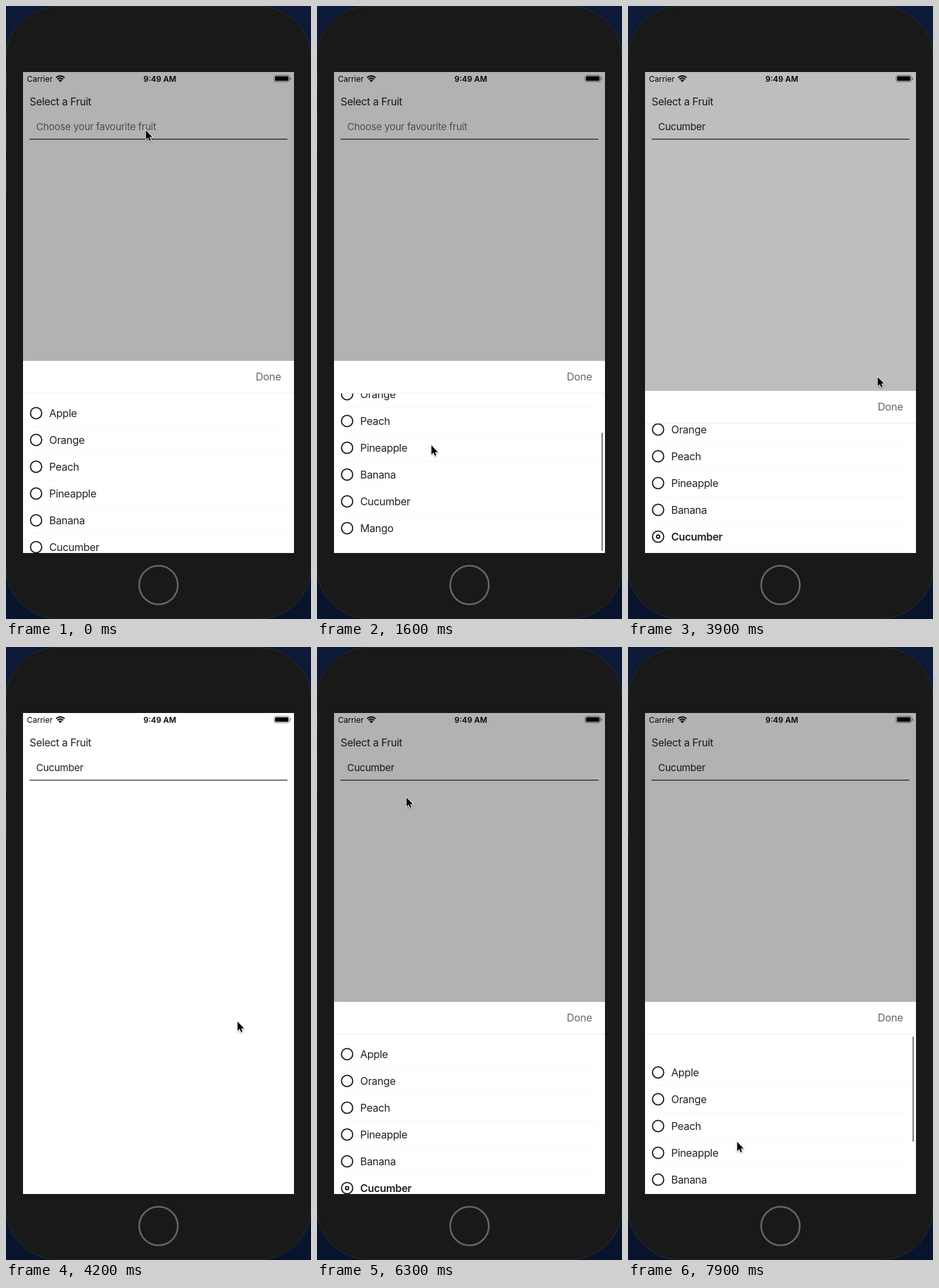
These frames come from a looping animation (466 by 938 pixels, 8000 ms). An HTML page with a canvas:

```html
<!DOCTYPE html>
<html lang="en">
<head>
<meta charset="utf-8">
<title>Fruit picker</title>
<style>
  html, body { margin: 0; width: 100%; height: 100%; overflow: hidden; background: #0b1730; }
  canvas { display: block; width: 466px; height: 938px; }
</style>
</head>
<body>
<canvas id="stage"></canvas>
<script>
const W = 466, H = 938, LOOP = 8000, STEP = 100;
const SCREEN = { x: 26, y: 101, w: 414, h: 736 };
const SHEET_Y = 543, LIST_Y = 593, LIST_H = 244, ROW = 41, MAX_SCROLL = 62;
const FRUITS = ['Apple', 'Orange', 'Peach', 'Pineapple', 'Banana', 'Cucumber', 'Mango'];
const PICK = 5, INK = '#212121';

// Pointer path: time, x, y
const POINTER = [
  [0, 213, 189], [100, 213, 189], [1000, 160, 748], [1600, 174, 671],
  [2200, 175, 778], [2300, 175, 778], [2800, 303, 680], [3200, 388, 592],
  [3600, 383, 566], [3800, 383, 566], [4200, 353, 572], [4300, 309, 579],
  [4800, 309, 579], [5600, 126, 199], [5700, 124, 198], [5800, 124, 198],
  [6300, 136, 229], [6560, 160, 698], [6700, 163, 645], [7050, 165, 616],
  [7600, 164, 650], [7900, 166, 756], [8000, 166, 760]
];

const canvas = document.getElementById('stage');
const ctx = canvas.getContext('2d');
const dpr = window.devicePixelRatio || 1;
canvas.width = W * dpr;
canvas.height = H * dpr;

const clamp = (v, lo = 0, hi = 1) => Math.min(hi, Math.max(lo, v));
const ramp = (t, a, b) => clamp((t - a) / (b - a));
const easeOut = p => 1 - (1 - p) ** 3;
const easeInOut = p => p * p * (3 - 2 * p);

// Slope at a key, flat where the motion turns round
function slope(i, axis) {
  const a = POINTER[i - 1], b = POINTER[i], c = POINTER[i + 1];
  if (!a || !c) return 0;
  const s1 = (b[axis] - a[axis]) / (b[0] - a[0]);
  const s2 = (c[axis] - b[axis]) / (c[0] - b[0]);
  return s1 * s2 <= 0 ? 0 : 2 * s1 * s2 / (s1 + s2);
}

function pointerAt(t) {
  let i = 0;
  while (i < POINTER.length - 2 && t >= POINTER[i + 1][0]) i++;
  const a = POINTER[i], b = POINTER[i + 1], d = b[0] - a[0], u = (t - a[0]) / d;
  const at = axis =>
    a[axis] + (b[axis] - a[axis]) * u * u * (3 - 2 * u) +
    d * u * (1 - u) * ((1 - u) * slope(i, axis) - u * slope(i + 1, axis));
  return { x: at(1), y: at(2) };
}

const stretch = d => LIST_H * (1 - 1 / (d * 0.55 / LIST_H + 1));
function rubber(d) {
  if (d < 0) return -stretch(-d);
  return d > MAX_SCROLL ? MAX_SCROLL + stretch(d - MAX_SCROLL) : d;
}

function scrollAt(t) {
  const y = pointerAt(t).y;
  if (t < 1000) return 0;
  if (t <= 1600) return rubber(748 - y);
  if (t < 4300) {
    const over = rubber(748 - pointerAt(1600).y) - MAX_SCROLL;
    return MAX_SCROLL + over * (1 - easeOut(ramp(t, 1600, 2200)));
  }
  return t < 6560 ? 0 : rubber(698.5 - y);
}

function barAlpha(t) {
  if (t >= 6560) return 1;
  return ramp(t, 1000, 1100) * (1 - ramp(t, 1950, 2200));
}

function sheetAt(t) {
  if (t < 5000) return 1 - easeInOut(ramp(t, 3800, 4200));
  return easeOut(ramp(t, 5800, 6250));
}

function text(str, x, y, size, color = INK, weight = 400, track = 0, align = 'left') {
  ctx.font = `${weight} ${size}px Inter, "Liberation Sans", sans-serif`;
  ctx.letterSpacing = track + 'px';
  ctx.textAlign = align;
  ctx.fillStyle = color;
  ctx.fillText(str, x, y);
}

function rect(x, y, w, h, color) {
  ctx.fillStyle = color;
  ctx.fillRect(x, y, w, h);
}

function pill(x, y, w, h, r, fill, stroke, line = 1) {
  ctx.beginPath();
  ctx.roundRect(x, y, w, h, r);
  if (fill) { ctx.fillStyle = fill; ctx.fill(); }
  if (stroke) { ctx.strokeStyle = stroke; ctx.lineWidth = line; ctx.stroke(); }
}

function ring(x, y, r, color, line) {
  ctx.beginPath();
  ctx.arc(x, y, r, 0, Math.PI * 2);
  ctx.strokeStyle = color;
  ctx.lineWidth = line;
  ctx.stroke();
}

function drawPhone() {
  const back = ctx.createLinearGradient(0, 0, 0, H);
  back.addColorStop(0, '#0d1a38');
  back.addColorStop(1, '#08142c');
  rect(0, 0, W, H, back);
  pill(-0.5, 0.5, W + 1, H - 1, 80, '#191919', '#2c2c2c');
  for (const [y, h] of [[101, 31], [163, 59], [232, 59]]) {
    rect(0, y, 1, h, '#2b2b2b');
    rect(0, y - 1, 1, 1, '#000');
    rect(0, y + h, 1, 1, '#000');
  }
  ring(233, 886, 29.5, '#666', 2.6);
}

function drawWifi() {
  const cx = 83, cy = 116;
  ctx.save();
  ctx.beginPath();
  ctx.moveTo(cx, cy + 0.5);
  ctx.lineTo(cx - 11, cy - 11);
  ctx.lineTo(cx + 11, cy - 11);
  ctx.clip();
  for (const r of [9, 5.7]) ring(cx, cy, r, '#000', 2);
  ctx.beginPath();
  ctx.arc(cx, cy, 3.5, 0, Math.PI * 2);
  ctx.fillStyle = '#000';
  ctx.fill();
  ctx.restore();
}

function drawPage(picked) {
  rect(SCREEN.x, SCREEN.y, SCREEN.w, SCREEN.h, '#fff');
  text('Carrier', 32, 116, 12, '#000');
  drawWifi();
  text('9:49 AM', 235, 116, 12, '#000', 600, 0, 'center');
  pill(409.5, 106, 23.5, 10, 3, null, 'rgba(0,0,0,.45)');
  pill(411, 107.5, 20.5, 7, 1.6, '#000');
  pill(434, 109, 1.3, 4, 0.6, 'rgba(0,0,0,.45)');
  text('Select a Fruit', 36, 151.5, 16, INK, 400, -0.32);
  text(picked ? FRUITS[PICK] : 'Choose your favourite fruit', 46, 190, 15,
    picked ? INK : '#707070', 400, -0.24);
  rect(36, 203, 394, 1.4, '#3c3c3c');
}

function drawList(t, picked) {
  const off = scrollAt(t);
  ctx.save();
  ctx.beginPath();
  ctx.rect(SCREEN.x, LIST_Y, SCREEN.w, LIST_H);
  ctx.clip();
  FRUITS.forEach((name, i) => {
    const y = LIST_Y + 30 + i * ROW - off, on = picked && i === PICK;
    ring(46, y, 8.6, '#141414', 1.8);
    if (on) ring(46, y, 2.4, '#141414', 1.9);
    text(name, 66, y + 5.7, 16, INK, on ? 600 : 400, -0.32);
    if (i < FRUITS.length - 1) rect(36, y + 20, 394, 1, '#f8f8f8');
  });
  const alpha = barAlpha(t);
  if (alpha > 0) {
    const over = Math.max(0, -off, off - MAX_SCROLL), len = 189 - over;
    const y = 596 + (238 - len) * clamp(off / MAX_SCROLL);
    pill(434.5, y, 2.5, len, 1.25, `rgba(0,0,0,${0.47 * alpha})`);
  }
  ctx.restore();
}

function drawSheet(t, picked) {
  const open = sheetAt(t);
  if (open <= 0) return;
  rect(SCREEN.x, SCREEN.y, SCREEN.w, SCREEN.h, `rgba(0,0,0,${0.3 * open})`);
  ctx.save();
  ctx.translate(0, (1 - open) * (SCREEN.y + SCREEN.h - SHEET_Y));
  rect(SCREEN.x, SHEET_Y, SCREEN.w, 294, '#fff');
  text('Done', 381.5, 573, 16, '#666', 400, -0.32);
  rect(SCREEN.x, 592, SCREEN.w, 1, '#ebebeb');
  drawList(t, picked);
  ctx.restore();
}

function drawPointer({ x, y }) {
  ctx.save();
  ctx.translate(x + 0.8, y + 1.2);
  ctx.beginPath();
  ctx.moveTo(0, 0);
  ctx.lineTo(0, 14);
  ctx.lineTo(3.2, 11);
  ctx.lineTo(5.4, 16);
  ctx.lineTo(7.5, 15.1);
  ctx.lineTo(5.4, 10.2);
  ctx.lineTo(9.8, 10.2);
  ctx.closePath();
  ctx.shadowColor = 'rgba(0,0,0,.4)';
  ctx.shadowBlur = 2 * dpr;
  ctx.shadowOffsetY = dpr;
  ctx.strokeStyle = '#fff';
  ctx.lineWidth = 1.8;
  ctx.stroke();
  ctx.shadowColor = 'transparent';
  ctx.fillStyle = '#000';
  ctx.fill();
  ctx.restore();
}

function draw(t) {
  const picked = t >= 2400;
  ctx.setTransform(dpr, 0, 0, dpr, 0, 0);
  drawPhone();
  ctx.save();
  ctx.beginPath();
  ctx.rect(SCREEN.x, SCREEN.y, SCREEN.w, SCREEN.h);
  ctx.clip();
  drawPage(picked);
  drawSheet(t, picked);
  drawPointer(pointerAt(t));
  ctx.restore();
}

function tick() {
  const t = performance.now() % LOOP;
  draw(Math.floor(t / STEP) * STEP);
  requestAnimationFrame(tick);
}
tick();
</script>
</body>
</html>
```
